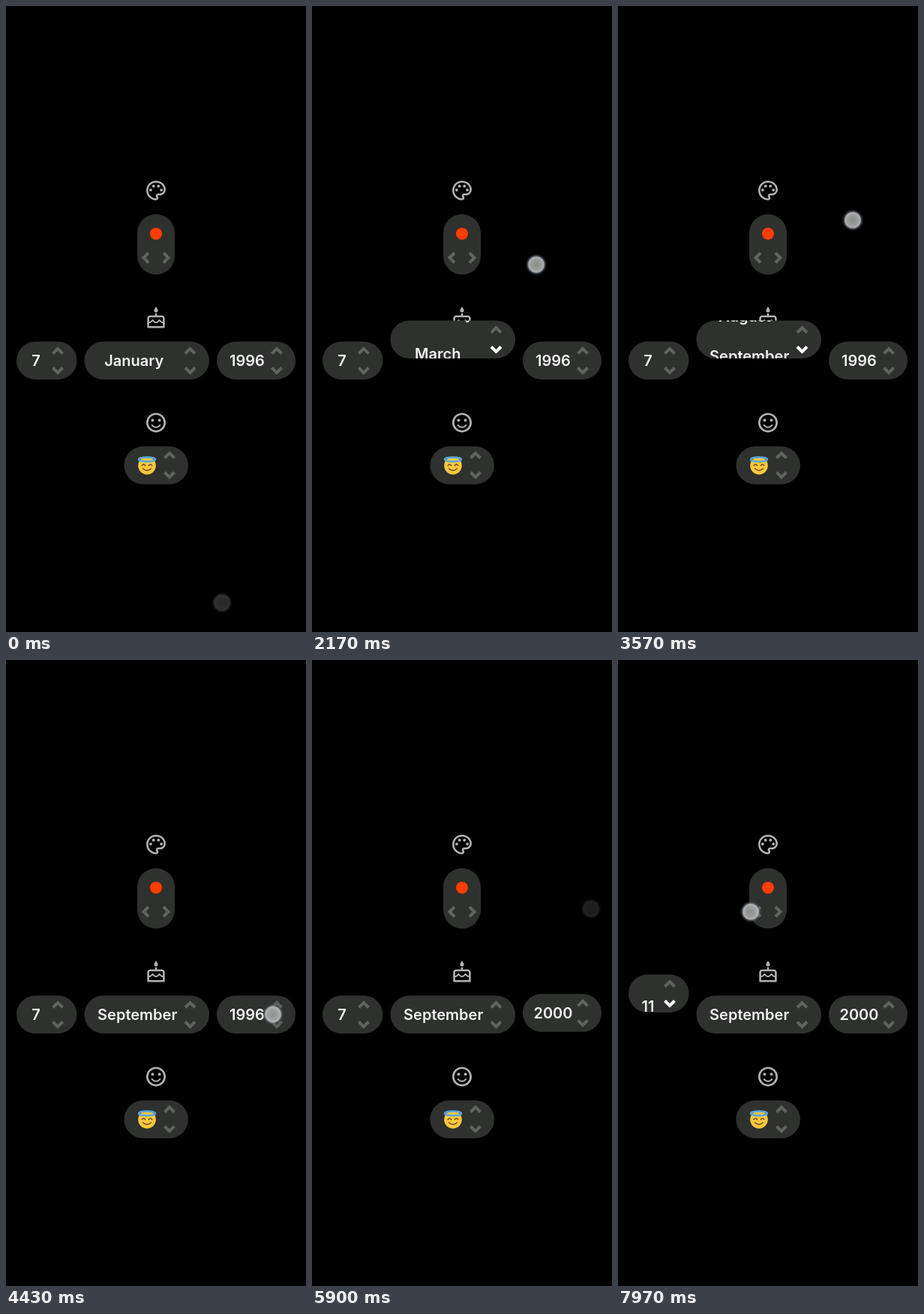
Recreate the animation shown at these times as an HTML page. Size 400 by 833 pixels, loop 8 s.

```html
<!DOCTYPE html>
<html lang="en">
<head>
<meta charset="utf-8">
<title>Date picker</title>
<style>
  html, body { margin: 0; width: 100%; height: 100%; overflow: hidden; background: #000; }
  svg { display: block; width: 100vw; height: 100vh; }
  text { font: 600 20px Inter, Roboto, sans-serif; fill: #f2f2f2; text-anchor: middle; }
  .pill { fill: #2f312f; }
  .chevron { fill: none; stroke: #616361; stroke-width: 4; }
  .chevron.lit { stroke: #fff; }
  .icon { fill: #b2b2b2; }
</style>
</head>
<body>
<svg viewBox="0 0 400 833">
  <defs>
    <radialGradient id="glow">
      <stop offset="0" stop-color="#989a98" stop-opacity=".92"/>
      <stop offset=".4" stop-color="#a4a6a4" stop-opacity=".92"/>
      <stop offset=".7" stop-color="#c0c2c2" stop-opacity=".9"/>
      <stop offset=".78" stop-color="#75828a" stop-opacity=".65"/>
      <stop offset="1" stop-color="#2c3a44" stop-opacity="0"/>
    </radialGradient>
  </defs>

  <!-- palette -->
  <g class="icon" transform="translate(184.4 229.9) scale(1.3)">
    <path d="M12 22C6.49 22 2 17.51 2 12S6.49 2 12 2s10 4.04 10 9c0 3.31-2.69 6-6 6h-1.77c-.28 0-.5.22-.5.5 0 .12.05.23.13.33.41.47.64 1.06.64 1.67 0 1.38-1.12 2.5-2.5 2.5zm0-18c-4.41 0-8 3.59-8 8s3.59 8 8 8c.28 0 .5-.22.5-.5 0-.16-.08-.28-.14-.35-.41-.46-.63-1.05-.63-1.65 0-1.38 1.12-2.5 2.5-2.5H16c2.21 0 4-1.79 4-4 0-3.86-3.59-7-8-7z"/>
    <circle cx="6.5" cy="11.5" r="1.5"/><circle cx="9.5" cy="7.5" r="1.5"/>
    <circle cx="14.5" cy="7.5" r="1.5"/><circle cx="17.5" cy="11.5" r="1.5"/>
  </g>
  <rect class="pill" x="175" y="277" width="50" height="80.5" rx="25"/>
  <circle cx="200" cy="303" r="8" fill="#ff3d00"/>
  <path class="chevron" d="M190 328.5l-6.5 6.5 6.5 6.5M210 328.5l6.5 6.5-6.5 6.5"/>

  <!-- cake -->
  <path class="icon" transform="translate(184.4 400) scale(1.3)" d="M18 9h-5V7h-2v2H6c-1.66 0-3 1.34-3 3v9q0 1 1 1h16q1 0 1-1V12c0-1.66-1.34-3-3-3zm1 11H5v-3c.9-.01 1.76-.37 2.4-1.01l1.09-1.07 1.07 1.07c1.31 1.31 3.59 1.3 4.89 0l1.08-1.07 1.07 1.07c.64.64 1.5 1 2.4 1.01zm0-4.5c-.51-.01-.99-.2-1.35-.57l-2.13-2.13-2.14 2.13c-.74.74-2.03.74-2.77 0L8.48 12.8l-2.14 2.13c-.35.36-.83.56-1.34.57V12c0-.55.45-1 1-1h12c.55 0 1 .45 1 1zM12 6c1.11 0 2-.9 2-2 0-.38-.1-.73-.29-1.03L12 0l-1.71 2.97c-.19.3-.29.65-.29 1.03 0 1.1.9 2 2 2z"/>

  <!-- face -->
  <g class="icon" transform="translate(184.4 538.8) scale(1.3)">
    <circle cx="12" cy="12" r="9" fill="none" stroke="#b2b2b2" stroke-width="2"/>
    <circle cx="8.5" cy="9.5" r="1.5"/><circle cx="15.5" cy="9.5" r="1.5"/>
    <path d="M12 16c-1.48 0-2.75-.81-3.45-2H6.88c.8 2.05 2.79 3.5 5.12 3.5s4.32-1.45 5.12-3.5h-1.67c-.7 1.19-1.97 2-3.45 2z"/>
  </g>
  <rect class="pill" x="157.5" y="586" width="85.5" height="50.5" rx="25.2"/>
  <path class="chevron" d="M211.5 601.5l6.5-6.5 6.5 6.5M211.5 620.5l6.5 6.5 6.5-6.5"/>
  <circle cx="188" cy="611.6" r="11.8" fill="#fdc83c"/>
  <ellipse cx="188" cy="603.4" rx="11" ry="2.9" fill="none" stroke="#58a9df" stroke-width="2.4"/>
  <g fill="none" stroke="#6b4a22" stroke-width="1.5" stroke-linecap="round">
    <path d="M181.2 611.5q2.2-3 4.4 0M190.4 611.5q2.2-3 4.4 0M182.5 615.5q5.5 5 11 0"/>
  </g>

  <g id="pickers"></g>
  <circle id="touch" r="14.5" fill="url(#glow)"/>
</svg>
<script>
const LOOP = 8000, REST_Y = 472, PITCH = 53, MAX_LIFT = 28, SETTLE = 280, FADE = 200;
const months = 'January February March April May June July August September'.split(' ');

// finger: time, x, y; scroll: time, steps from the first value; skew: label shift per unit of width
const pickers = [
  { x: 14, width: 80.5, arrow: 69, center: 40, skew: 0, press: 6300, release: 8200,
    value: i => 7 + i,
    finger: [[6500, 90, 472], [6770, 137, 444], [7970, 177, 335]],
    scroll: [[6840, 0], [8200, 4.42]] },
  { x: 104.5, width: 166.5, arrow: 245.5, center: 157.5, skew: .167, press: 1470, release: 3610,
    value: i => months[i] ?? '',
    finger: [[1600, 247, 472], [2170, 299, 344], [3070, 297, 370], [3500, 313, 285]],
    scroll: [[1665, 0], [3070, 4.56], [3640, 8]] },
  { x: 281, width: 105, arrow: 361, center: 321.5, skew: 0, press: 4270, release: 5740,
    value: i => 1996 + i,
    finger: [[4430, 356, 472], [5230, 371, 341], [5500, 372, 331]],
    scroll: [[4530, 0], [5760, 4]] }
];

const clamp = (v, lo = 0, hi = 1) => Math.min(hi, Math.max(lo, v));
const linear = p => p;
const easeOut = p => 1 - (1 - p) ** 3;

function sample(keys, t, column, ease) {
  if (t <= keys[0][0]) return keys[0][column];
  const next = keys.findIndex(k => k[0] > t);
  if (next < 0) return keys.at(-1)[column];
  const a = keys[next - 1], b = keys[next];
  return a[column] + (b[column] - a[column]) * ease((t - a[0]) / (b[0] - a[0]));
}

function add(parent, tag, attributes = {}) {
  const node = document.createElementNS('http://www.w3.org/2000/svg', tag);
  for (const [name, value] of Object.entries(attributes)) node.setAttribute(name, value);
  return parent.appendChild(node);
}

pickers.forEach((p, n) => {
  const shape = { x: p.x, y: 446.5, width: p.width, height: 50.5, rx: 25.2 };
  const left = p.arrow - 6.5;
  p.group = add(document.getElementById('pickers'), 'g');
  add(add(p.group, 'clipPath', { id: 'clip' + n }), 'rect', shape);
  add(p.group, 'rect', { ...shape, class: 'pill' });
  const labels = add(p.group, 'g', { 'clip-path': `url(#clip${n})` });
  p.labels = [add(labels, 'text'), add(labels, 'text')];
  p.up = add(p.group, 'path', { class: 'chevron', d: `M${left} 462.5l6.5-6.5 6.5 6.5` });
  p.down = add(p.group, 'path', { class: 'chevron', d: `M${left} 481.5l6.5 6.5 6.5-6.5` });
});

const touch = document.getElementById('touch');

function showTouch(x, y, opacity) {
  touch.setAttribute('cx', x);
  touch.setAttribute('cy', y);
  touch.setAttribute('opacity', opacity);
}

function drawPicker(p, t) {
  const x = sample(p.finger, t, 1, easeOut), y = sample(p.finger, t, 2, easeOut);
  const settled = easeOut(clamp((t - p.release) / SETTLE));
  const lift = clamp((REST_Y - y) * .237, 0, MAX_LIFT) * (1 - settled);
  const scroll = sample(p.scroll, t, 1, linear), first = Math.floor(scroll);

  p.group.setAttribute('transform', `translate(0 ${-lift})`);
  p.labels.forEach((label, k) => {
    label.textContent = p.value(first + k);
    label.setAttribute('x', p.center + p.skew * label.getComputedTextLength());
    label.setAttribute('y', 479.2 + (first + k - scroll) * PITCH);
  });

  const active = t < p.release && lift > 1;
  p.up.classList.toggle('lit', active && scroll === 0);
  p.down.classList.toggle('lit', active && scroll > 0);

  if (t >= p.press && t < p.release + FADE)
    showTouch(x, y, Math.min(clamp((t - p.press + 30) / 90), 1 - clamp((t - p.release) / FADE)));
}

function frame(now) {
  const t = now % LOOP;
  showTouch(288, 794, .28 * (1 - clamp(t / 150)));
  pickers.forEach(p => drawPicker(p, t));
  requestAnimationFrame(frame);
}
frame(0);
</script>
</body>
</html>
```
